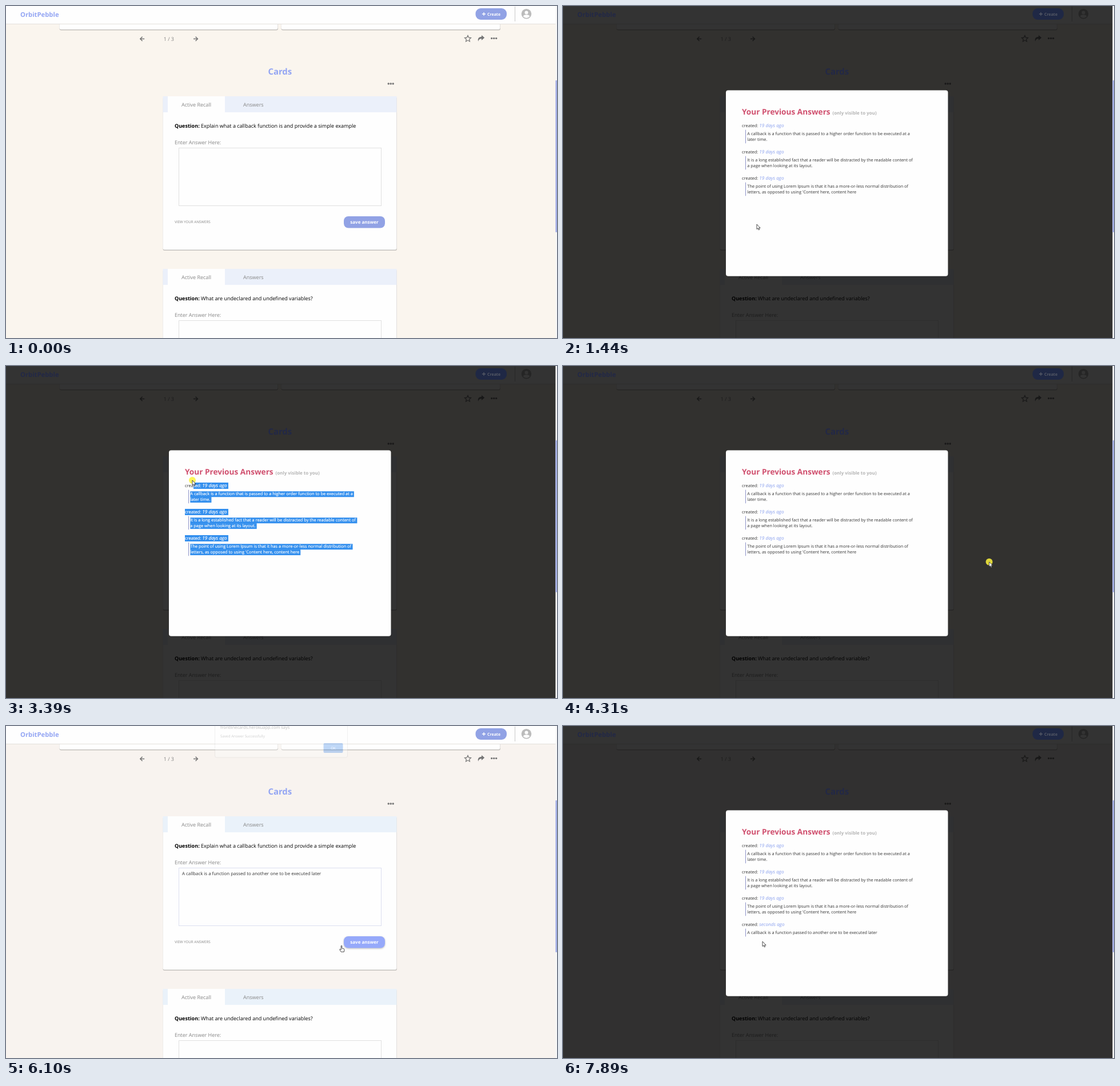
Write an HTML page that moves like this. It is 964 by 581 pixels and loops after 8000 ms.

```html
<!DOCTYPE html>
<html lang="en">
<head>
<meta charset="utf-8">
<title>Study cards</title>
<style>
html, body { margin: 0; width: 100%; height: 100%; overflow: hidden; }
svg { display: block; width: 964px; height: 581px; --blue: #93a5f3; --button: #91a2e5; --label: #fff; --tabs: #ebf0fa; }
svg.late { --tabs: #eaf2fa; }
svg.dim { --blue: #222847; --button: #1f2845; --label: #565a66; }
text { font-family: "Open Sans", sans-serif; text-rendering: geometricPrecision; white-space: pre; }
.b { font-weight: 700; }
.i { font-style: italic; }
.g { fill: #858585; }
.blue { fill: var(--blue); }
.title { fill: #d0506f; }
.note { fill: #b4b4b4; }
.when { fill: #8ba1ee; }
.mid { text-anchor: middle; }
.icon { fill: none; stroke: #767676; stroke-width: 1.5; }
#white text { fill: #fff; stroke: #fff; stroke-width: .15px; }
</style>
</head>
<body>
<svg id="stage" viewBox="0 0 964 581"></svg>
<script>
const $ = id => document.getElementById(id);
const all = selector => [...document.querySelectorAll(selector)];
const rect = (x, y, w, h, fill, more = '') =>
  `<rect x="${x}" y="${y}" width="${w}" height="${h}" fill="${fill}" ${more}/>`;
const text = (x, y, s, cls = '', size = 9.04, more = '') =>
  `<text x="${x}" y="${y}" class="${cls}" font-size="${size}" ${more}>${s}</text>`;
const dots = (x, y) => [-4, 0, 4].map(d => `<circle cx="${x + d}" cy="${y}" r="1.7" fill="#767676"/>`).join('');
const panel = (x, y, w, h) =>
  rect(x, y + 1, w + .5, h + .5, '#c4c1bd', 'rx="3"') + rect(x, y, w, h, '#fefefe', 'rx="3"');

const card = (y, question) => panel(274.5, y, 409, 268.5) +
  rect(274.5, y, 409, 28, 'var(--tabs)') + rect(283, y, 100, 29, '#fefefe') +
  text(307, y + 18, 'Active Recall', 'g') + text(415, y + 18, 'Answers', 'g') +
  text(295, y + 55, 'Question:', 'b') + text(341, y + 55, question) +
  text(295, y + 84, 'Enter Answer Here:', 'g') +
  rect(302.5, y + 90.5, 354, 101, '#fefefe', 'stroke="#e0e0e0" class="box"');

const answer = 'A callback is a function passed to another one to be executed later';
const entries = [
  ['19 days ago', 'A callback is a function that is passed to a higher order function to be executed at a', 'later time.'],
  ['19 days ago', 'It is a long established fact that a reader will be distracted by the readable content of',
    'a page when looking at its layout.'],
  ['19 days ago', 'The point of using Lorem Ipsum is that it has a more-or-less normal distribution of',
    "letters, as opposed to using 'Content here, content here"],
  ['seconds ago', answer]];
const row = s => `<g class="row">${s}</g>`;
function entry([when, ...lines], i) {
  const y = 212 + 46 * i;
  return row(text(313, y, 'created:', '', 7.53) + text(343.3, y, when, 'i when', 8.2)) +
    lines.map((s, k) => row(text(322.3, y + 14.3 + k * 9.8, s, '', 7.38))).join('') +
    rect(319, y + 4.7, 1, lines.length * 9.8 + 4, '#8d93c8');
}
const oldRows = row(text(313, 190, 'Your Previous Answers', 'b title', 13.64) +
  text(471.5, 190, '(only visible to you)', 'b note', 7.95)) + entries.slice(0, 3).map(entry).join('');

$('stage').innerHTML = `
${rect(0, 0, 964, 581, '#faf5ee', 'id="back"')}
${panel(93.5, 10, 382, 31)}${panel(481.5, 10, 383, 31)}
${rect(0, 0, 964, 31, '#fefefe')}${rect(0, 31, 964, 1, '#e3e0dc')}
${rect(890, 1, 1, 26, '#c9c9c9')}
<circle cx="910.5" cy="13.7" r="8.8" fill="#bcbcbc"/>
<circle cx="910.5" cy="11.4" r="3" fill="#fff"/>
<path d="M905 18.5q0-3.3 5.5-3.3t5.5 3.3q-2 2.4-5.5 2.4t-5.5-2.4z" fill="#fff"/>
<path class="icon" d="M242.2 57.5h-7.4m3.8-3.8-3.8 3.8 3.8 3.8M328 57.5h7.4m-3.8-3.8 3.8 3.8-3.8 3.8"/>
${text(275.7, 61, '1 / 3', 'g')}
<path class="icon" style="stroke-width:1.2" d="M808 51.6l1.6 3.6 3.9.4-2.9 2.6.8 3.9-3.4-2-3.4 2 .8-3.9-2.9-2.6 3.9-.4z"/>
<path d="M832 51l5.2 4.5-5.2 4.5v-2.7q-5 0-5.8 4.7-2-7.700 5.800-8.200z" fill="#767676"/>
${dots(853.7, 56.6)}${dots(673.2, 136)}
${card(158, 'Explain what a callback function is and provide a simple example')}
${text(295, 380.2, 'VIEW YOUR ANSWERS', '', 6.2, 'id="link"')}
${rect(591, 368, 72, 20.5, '', 'rx="8" id="save"')}
${text(627, 381, 'save answer', 'b mid', 8, 'fill="#fff"')}
${text(308, 260.8, '', '', 7.9, 'id="typed" fill="#333"')}
${card(460, 'What are undeclared and undefined variables?')}
${rect(0, 0, 962, 581, '#000', 'id="shade" opacity=".8"')}
${rect(961.4, 0, 2.6, 581, '#f7f7f7')}${rect(961.4, 130, 2.6, 266, '#a3aee6', 'rx="1"')}
${text(25, 18.7, 'OrbitPebble', 'b blue', 11.25)}
${text(479.3, 120, 'Cards', 'b mid blue', 14.9)}
${rect(821.5, 4, 54.5, 20, 'var(--button)', 'rx="9"')}
<path d="M833 14h6m-3-3v6" stroke="var(--label)" stroke-width="1.3"/>
${text(842, 16.6, 'Create', 'b', 7, 'fill="var(--label)"')}
<g id="modal" fill="#333">
${rect(285, 147.5, 388.5, 325.3, '#fefefe', 'rx="4"')}
<g id="old">${oldRows}</g>
<g id="latest">${entry(entries[3], 3)}</g>
<g id="marks" fill="#338fee"></g><clipPath id="picked"></clipPath>
<g id="white" clip-path="url(#picked)"></g>
</g>
<g id="alert">
${rect(365.5, -20, 232, 86, '#fff', 'rx="3" stroke="#bbb" stroke-width=".8"')}
${text(375, 16, 'frontlinecards.herokuapp.com says', '', 7.4, 'fill="#222"')}
${text(375, 30.5, 'Saved Answer Successfully', '', 6.3, 'fill="#555"')}
${rect(555.5, 41, 34, 17, '#1a73e8', 'rx="2"')}
${text(572.5, 51.8, 'OK', 'mid', 6.2, 'fill="#fff"')}
</g>
<g id="pointer" fill="#fff" stroke="#222" stroke-width=".8">
<circle id="glow" r="6" fill="#fdf33c" fill-opacity=".85" stroke="none"/>
<path id="arrow" d="M0 0v8.6l2-1.7 1.3 3 1.5-.7-1.3-2.8h2.6z"/>
<path id="hand" d="M-.8.8Q0-.3.8.8V5l3.4.9q1 .4.8 1.6l-.7 3.8H-.8L-3.3 7.500q-.2-1.300 1-.9L-.8 7.700z"/>
<path id="beam" d="M-1.500-4.500h3m-1.500 0v9m-1.500 0h3" fill="none"/>
</g>`;

// Each selectable row is highlighted over its own text box
const boxes = all('#old .row').map(r => r.getBBox());
$('marks').innerHTML = $('picked').innerHTML =
  boxes.map(b => rect(b.x, b.y, 0, b.height, '#338fee')).join('');
$('white').innerHTML = $('old').innerHTML;

// Pointer stops: [ms, x, y]
const link = [339, 382], area = [480, 287], save = [629, 379], ok = [572, 49], lineEnd = [513, 326], away = [722, 328];
const stops = [[70, 832, 551], [830, 503, 170], [1300, ...link], [1600, ...link], [1800, 275, 310], [2030, 546, 230],
  [2210, 420, 356], [2540, ...lineEnd], [2600, ...lineEnd], [3240, 345, 234], [3390, 326, 200], [3470, 322, 182],
  [3620, 322, 182], [4250, 757, 350], [4410, ...away], [4580, ...away], [4880, ...area], [5400, ...area],
  [5560, 560, 417], [5750, ...save], [5950, ...save], [6100, 587, 384], [6500, ...ok], [6870, ...ok],
  [7550, ...link], [7700, ...link], [7890, 349, 377], [8000, 349, 377]];
const clamp = v => Math.max(0, Math.min(1, v));
function pointerAt(t) {
  const n = Math.max(1, stops.findIndex(s => s[0] > t));
  const [t0, x0, y0] = stops[n - 1], [t1, x1, y1] = stops[n];
  const k = clamp((t - t0) / (t1 - t0)), e = k * k * (3 - 2 * k);
  return [x0 + (x1 - x0) * e, y0 + (y1 - y0) * e];
}

const clicks = [1300, 4300, 4880, 5780, 6560, 7580];
const between = (v, a, b) => v >= a && v < b;
const show = (id, on) => $(id).style.display = on ? '' : 'none';

function select(on, x, y) {
  boxes.forEach((b, i) => {
    const above = i ? boxes[i - 1].y + boxes[i - 1].height : 0;
    const right = b.x + b.width + 2;
    const from = y <= above ? b.x : y <= b.y + b.height ? Math.min(right, Math.max(b.x, x + 2)) : right;
    for (const id of ['marks', 'picked']) {
      const mark = $(id).children[i];
      mark.setAttribute('x', from);
      mark.setAttribute('width', on ? right - from : 0);
    }
  });
}

function draw(t) {
  const [x, y] = pointerAt(t), late = t >= 4540;
  const over = (left, top, w, h) => between(x, left, left + w) && between(y, top, top + h);
  const modal = between(t, 1440, 4540) || t >= 7730;
  const alert = between(t, 5950, 6870);
  const dragging = between(t, 2600, 3620);
  const onLink = !modal && over(295, 368, 64, 20);
  const onSave = alert || !modal && over(591, 368, 72, 21);
  const hand = onLink || onSave && y > 200;
  const beam = !modal && !hand && over(303, 248, 354, 101);

  $('stage').classList.toggle('dim', modal);
  $('stage').classList.toggle('late', late);
  $('back').style.fill = late ? '#f8f3ef' : '#faf5ee';
  show('shade', modal);
  show('modal', modal);
  show('latest', late);
  select(dragging, x, y);

  all('.box')[0].style.stroke = t > 350 ? '#dcdff0' : '#e0e0e0';
  $('link').style.fill = onLink ? '#93a5f3' : '#858585';
  $('save').style.fill = onSave ? '#96a9fa' : '#91a2e5';
  $('save').style.filter = onSave ? 'drop-shadow(0 1.5px 1.5px #0004)' : '';
  $('typed').textContent = t < 6870 ? answer.slice(0, Math.round(answer.length * clamp((t - 4950) / 550))) : '';

  const shown = clamp((t - 6030) / 260);
  show('alert', alert);
  $('alert').setAttribute('opacity', shown);
  $('alert').setAttribute('transform', `translate(0 ${15 * (shown - 1)})`);

  show('pointer', t >= 70);
  $('pointer').setAttribute('transform', `translate(${x} ${y})`);
  show('hand', hand);
  show('beam', beam);
  show('arrow', !hand && !beam);
  show('glow', dragging || clicks.some(c => between(t, c, c + 140)));
}

const start = performance.now();
function frame(now) {
  draw(Math.max(0, now - start) % 8000);
  requestAnimationFrame(frame);
}
draw(0);
requestAnimationFrame(frame);
</script>
</body>
</html>
```
